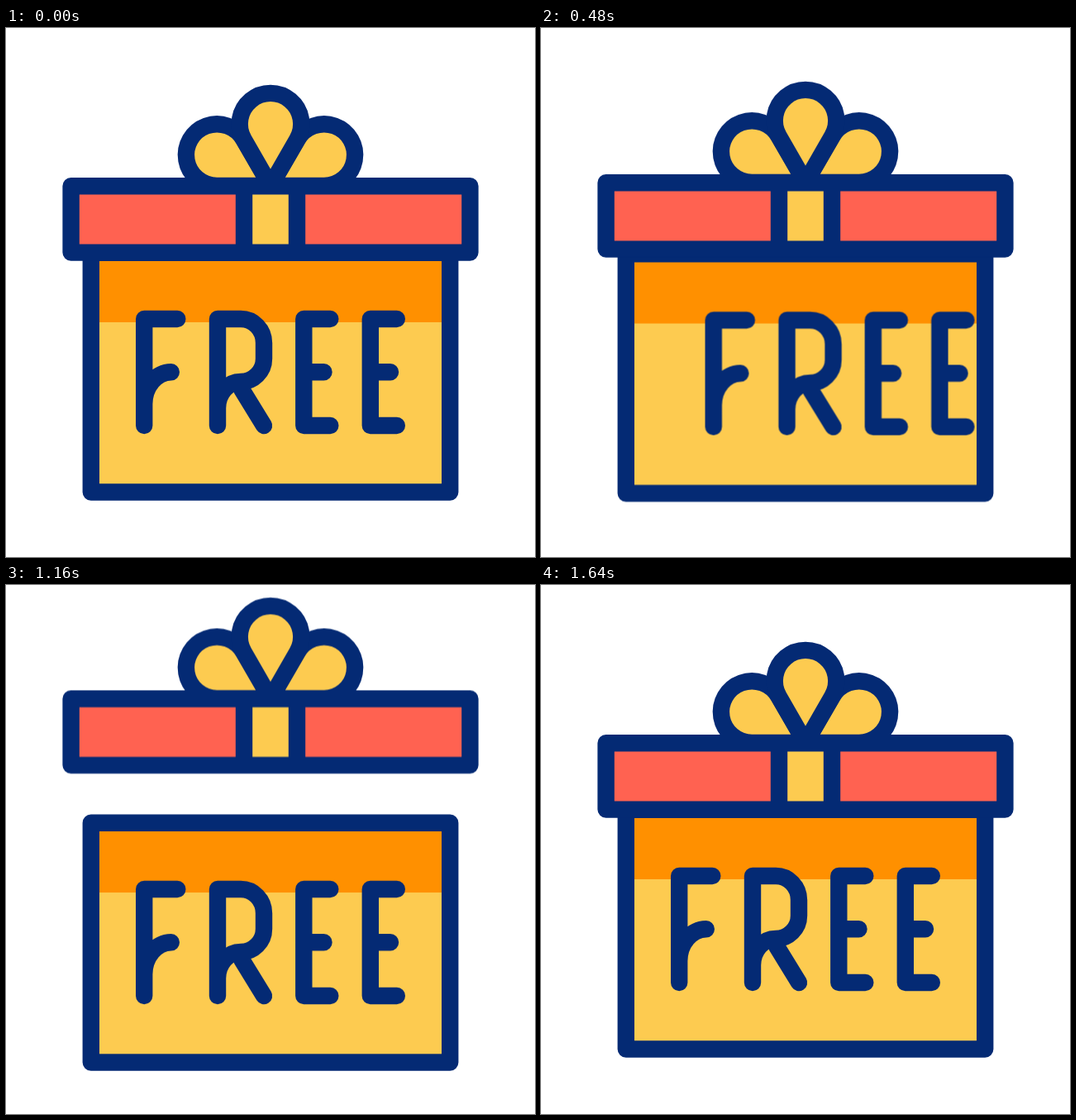
An HTML page for the animation above (2000 ms loop, 640 px wide and 640 px high).

```html
<!DOCTYPE html>
<html lang="en">
<head>
<meta charset="utf-8">
<title>Free gift</title>
<style>
  html, body { margin: 0; width: 100%; height: 100%; overflow: hidden; background: #fff; }
  svg { display: block; width: 100%; height: 100%; }
  .line { fill: none; stroke: #042a74; stroke-width: 20.4; stroke-linecap: round; stroke-linejoin: round; }
  .yellow { fill: #fdcb50; }
  .orange { fill: #ff9000; }
  .red { fill: #ff6251; }

  /* The clock in --t drives every paused animation in 25 fps steps. */
  .gift, .box, .lid, .word {
    animation: 2000ms linear calc(var(--t, 0) * -1ms) infinite paused;
  }
  .gift { animation-name: pop; transform-origin: 320px 425px; }
  .box { animation-name: sink; }
  .lid { animation-name: lift; }
  .word { animation-name: slide; }

  @keyframes slide {
    0%, 8% { transform: translateX(0); animation-timing-function: ease-in-out; }
    12% { transform: translateX(37px); animation-timing-function: cubic-bezier(.4, 0, .8, .8); }
    16% { transform: translateX(-222px); }
    19% { transform: translateX(-400px); }
    19.01% { transform: translateX(400px); animation-timing-function: cubic-bezier(.2, .6, .4, 1); }
    28%, 100% { transform: translateX(0); }
  }
  @keyframes lift {
    0%, 22% { transform: translateY(0); animation-timing-function: cubic-bezier(.4, 0, .7, .75); }
    30% { transform: translateY(-43px); animation-timing-function: cubic-bezier(.3, .6, .6, 1); }
    34% { transform: translateY(-51px); }
    63% { transform: translateY(-54.1px); animation-timing-function: cubic-bezier(.5, 0, .8, .7); }
    70% { transform: translateY(-30.5px); animation-timing-function: cubic-bezier(.2, .4, .5, 1); }
    77%, 100% { transform: translateY(0); }
  }
  @keyframes sink {
    0%, 22% { transform: translateY(0); animation-timing-function: cubic-bezier(.4, 0, .6, 1); }
    30% { transform: translateY(11px); }
    63% { transform: translateY(16.9px); animation-timing-function: ease-in; }
    70% { transform: translateY(12px); animation-timing-function: cubic-bezier(.2, .4, .5, 1); }
    77%, 100% { transform: translateY(0); }
  }
  @keyframes pop {
    0%, 70% { transform: scale(1); animation-timing-function: ease-in-out; }
    74% { transform: scale(1.133); animation-timing-function: ease-in-out; }
    82%, 100% { transform: scale(1); }
  }
</style>
</head>
<body>
<svg viewBox="0 0 640 640" role="img" aria-label="FREE">
  <defs>
    <clipPath id="front"><path d="M103 272H537V562H103Z"/></clipPath>
    <path id="petal" d="M320 191L352.3 134.8A37.3 37.3 0 1 0 287.7 134.8Z"/>
    <path id="e" d="M392.3 352H360.3V481H392.3M360.3 416.3H384.5"/>
  </defs>
  <g class="gift">
    <g class="box">
      <path class="yellow" d="M103 272H537V562H103Z"/>
      <path class="orange" d="M103 272H537V356H103Z"/>
      <g clip-path="url(#front)">
        <g class="word line">
          <path d="M207.3 352H167.2V481M167.2 455A33 39 0 0 1 199.8 416.3"/>
          <path d="M256 481V352H284A28 29 0 0 1 312 381V400A28 28 0 0 1 284 428A28 32 0 0 0 256 460M285 437L312 481"/>
          <use href="#e"/>
          <use href="#e" x="80.5"/>
        </g>
      </g>
      <path class="line" d="M102.8 271.7H537.2V561.5H102.8Z"/>
    </g>
    <g class="lid">
      <g class="yellow line" style="fill:#fdcb50">
        <use href="#petal" transform="rotate(-60 320 191)"/>
        <use href="#petal" transform="rotate(60 320 191)"/>
        <use href="#petal"/>
      </g>
      <path class="red" d="M78.6 191.3H561.4V271.6H78.6Z"/>
      <path class="yellow" d="M288 191.3H352V271.6H288Z"/>
      <path class="line" d="M78.6 191.3H561.4V271.6H78.6ZM288 191.3V271.6M352 191.3V271.6"/>
    </g>
  </g>
</svg>
<script>
  const LOOP = 2000, STEP = 40;
  const start = performance.now();
  const root = document.documentElement;

  function tick() {
    const t = (performance.now() - start) % LOOP;
    root.style.setProperty('--t', Math.floor(t / STEP) * STEP);
    requestAnimationFrame(tick);
  }
  tick();
</script>
</body>
</html>
```
